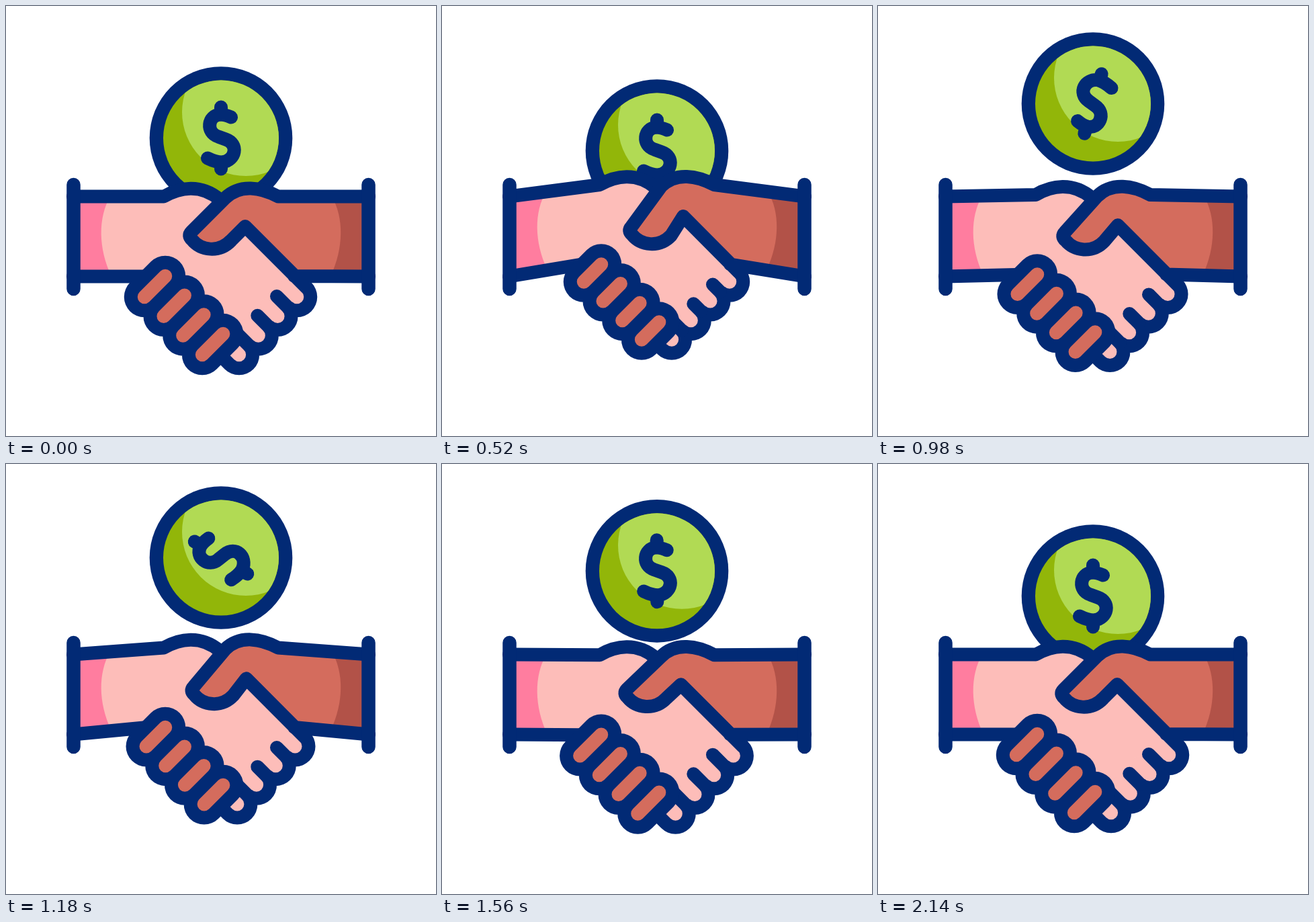
These frames come from a looping animation (640x640 px, 2340 ms). An HTML page with a canvas:

```html
<!DOCTYPE html>
<html>
<head>
<meta charset="utf-8">
<style>
html, body { margin: 0; width: 100%; height: 100%; overflow: hidden; background: #fff; }
canvas { display: block; width: 640px; height: 640px; }
</style>
</head>
<body>
<canvas width="640" height="640"></canvas>
<script>
const ctx = document.querySelector('canvas').getContext('2d');
const LOOP = 2340;
const NAVY = '#022a75', PINK = '#ff7d9f', LIGHT = '#fdbdb9', BROWN = '#d46c5d',
  DARK = '#b25248', LIME = '#b1da54', GREEN = '#92b609';

// Easing
const sine = u => (1 - Math.cos(Math.PI * u)) / 2;
const fall = u => u ** 2.3;
const rise = u => 1 - (1 - u) ** 2;
function launch(u) { // cubic-bezier(.33, 0, .07, 1)
  let lo = 0, hi = 1, s;
  for (let i = 0; i < 24; i++) {
    s = (lo + hi) / 2;
    const x = 0.99 * s * (1 - s) ** 2 + 0.21 * s * s * (1 - s) + s ** 3;
    if (x < u) lo = s; else hi = s;
  }
  return s * s * (3 - 2 * s);
}

// Keys are [time, value, easing used to get there]
function track(keys, t) {
  let [t0, v0] = keys[0];
  if (t <= t0) return v0;
  for (const [t1, v1, ease = sine] of keys) {
    if (t < t1) return v0 + (v1 - v0) * ease((t - t0) / (t1 - t0));
    t0 = t1;
    v0 = v1;
  }
  return v0;
}

const SHAKE = [[220, 0], [520, -17.5], [820, 9], [1120, -12], [1420, 8.5], [1720, -9], [2140, 0]];
const CURL = [[220, 0], [520, 5], [820, -0.4], [1120, 3.4], [1420, -3.4], [1720, 2.7], [2140, 0]];
const TOSS = [[220, 0], [520, 19], [1280, -57.5, launch], [1720, 0, fall], [1870, -13, rise], [2140, 0]];
const SPIN = [[520, 0], [1600, 4 * Math.PI, launch]];

function fill(d, color) {
  ctx.fillStyle = color;
  ctx.fill(new Path2D(d));
}
function stroke(d, color = NAVY, width = 20) {
  ctx.strokeStyle = color;
  ctx.lineWidth = width;
  ctx.stroke(new Path2D(d));
}
function disc(x, y, r, color) {
  ctx.fillStyle = color;
  ctx.beginPath();
  ctx.arc(x, y, r, 0, 7);
  ctx.fill();
}

function coin(y, angle) {
  ctx.save();
  ctx.translate(320, 196.5 + y);
  disc(0, 0, 106.3, NAVY);
  ctx.beginPath();
  ctx.arc(0, 0, 86, 0, 7);
  ctx.clip();
  disc(0, 0, 87, GREEN);
  disc(37, -38.5, 95, LIME);
  ctx.rotate(angle);
  stroke('M15 -31C8 -34 3 -35 -1 -35C-20 -34 -23 -8 -4 -2L7 2C27 9 22 33 2 36C-4 36 -12 34 -20 30M0 -46V-36M0 36V46');
  ctx.restore();
}

// d: vertical shift of the hands, c: how far fingers and thumb curl
function hands(d, c) {
  const at = (x, y) => `${x} ${y + d} `;
  const tip = (x, y) => at(x - c, y - c);
  const thumb = (x, y) => at(x + 1.2 * c, y + 2 * c);
  const apex = at(356 + 0.6 * c, 328 + 0.5 * c);
  const each = f => [0, 1, 2, 3].map(i => f(28.7 * i)).join('');

  const lightFingers = each(k => 'M' + tip(433 - k, 433 + k) + 'L' + at(417 - k, 417 + k));
  const slots = [0, 28.7, 57.4].map(k => 'M' + at(403 - k, 432 + k) + 'L' + tip(419 - k, 448 + k)).join('');
  const brownFingers = each(k => 'M' + at(237 + k, 402 + k) + 'L' + at(206 + k + c, 433 + k - c));

  const leftTop = 'L' + at(235, 283.5) + 'C' + at(258, 270) + at(290, 264) + at(318, 288);
  const thumbEdge = 'L' + at(405, 283.5) + 'C' + at(380, 270) + at(348, 264) + at(326, 286) +
    'L' + thumb(276, 336) + 'Q' + thumb(270, 342) + thumb(277, 348) +
    'C' + thumb(290, 364) + thumb(317, 368) + thumb(335, 349) + 'L' + apex;
  const palm = 'L' + apex + 'L' + tip(440, 426) + 'L' + tip(433, 433) + 'L' + tip(347, 519) +
    'L' + at(300, 485) + 'L' + at(205, 402.5);
  const rightLow = 'L' + at(429, 402);

  // Light arm and palm
  stroke(lightFingers, NAVY, 60.5);
  fill('M100 283.5' + leftTop + palm + 'L100 402.5Z', PINK);
  const top = 283.5 + 0.41 * d, low = 402.5 + 0.54 * d;
  fill(`M155 ${top}` + leftTop + palm + `L157 ${low}C137 ${360 + d / 2} 137 ${315 + d / 2} 155 ${top}Z`, LIGHT);
  stroke(lightFingers, LIGHT, 20.5);
  stroke(slots);
  stroke('M100 283.5' + leftTop + 'M100 402.5L' + at(205, 402.5));

  // Dark arm and thumb
  fill('M540 283.5' + thumbEdge + rightLow + 'L540 402.5Z', DARK);
  fill(`M485 ${top}` + thumbEdge + rightLow + `L483 ${low}C503 ${360 + d / 2} 503 ${315 + d / 2} 485 ${top}Z`, BROWN);
  stroke('M540 283.5' + thumbEdge + 'L' + tip(447, 419) + 'M540 402.5' + rightLow);

  stroke(brownFingers, NAVY, 60.5);
  stroke(brownFingers, BROWN, 20.5);
  stroke('M100.5 266V421M539.5 266V421', NAVY, 20.5);
}

function draw(now) {
  const t = now % LOOP;
  ctx.fillStyle = '#fff';
  ctx.fillRect(0, 0, 640, 640);
  ctx.lineCap = ctx.lineJoin = 'round';
  coin(track(TOSS, t), track(SPIN, t));
  hands(track(SHAKE, t), track(CURL, t));
}

let start;
function tick(now) {
  start ??= now;
  draw(now - start);
  requestAnimationFrame(tick);
}
draw(0);
requestAnimationFrame(tick);
</script>
</body>
</html>
```
